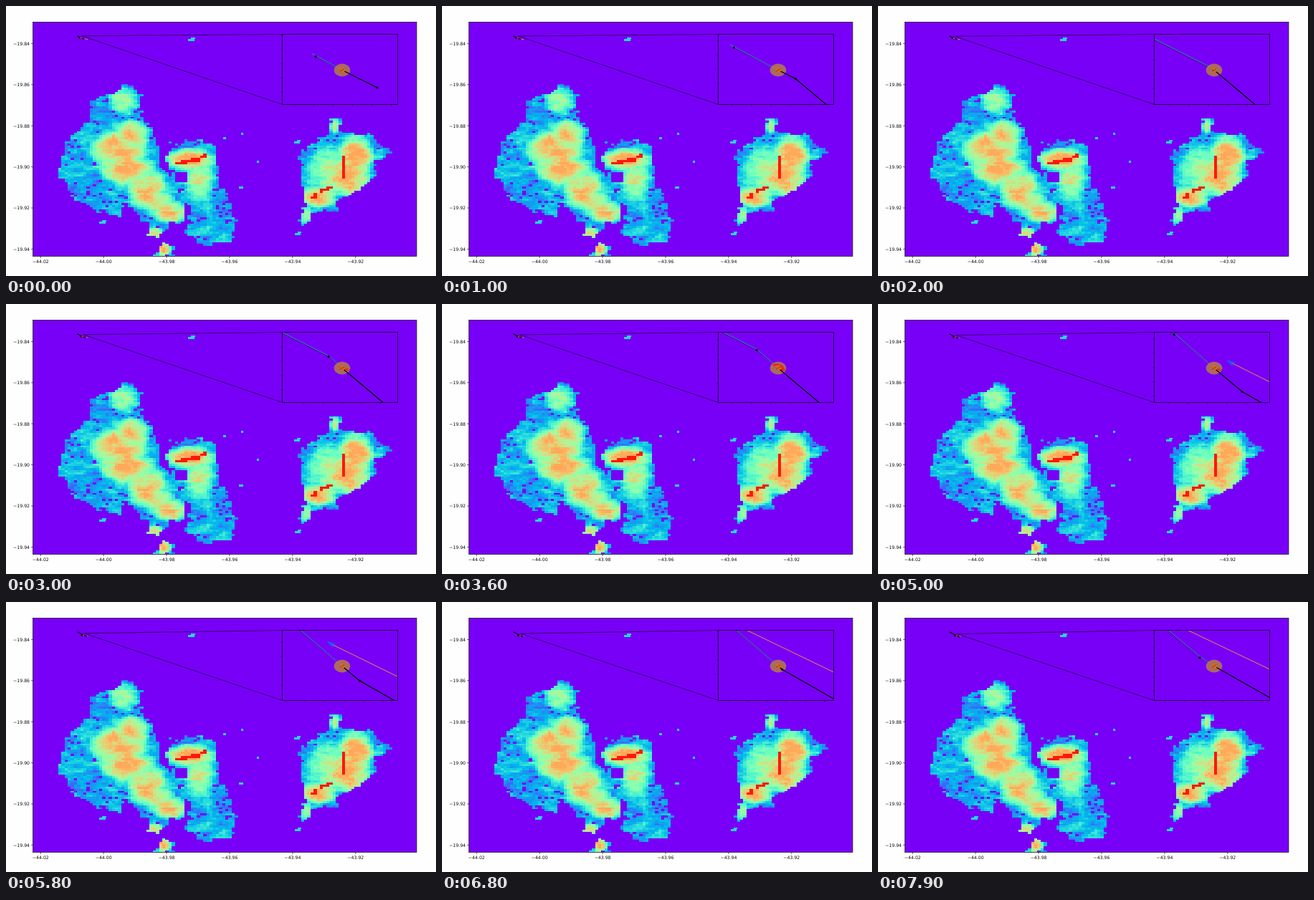
Animation, 600 px wide and 377 px high, one loop 8 s. Source, as an HTML page with a canvas:

```html
<!DOCTYPE html>
<html>
<head>
<meta charset="utf-8">
<style>
html, body { margin: 0; width: 100%; height: 100%; overflow: hidden; background: #fefefe; }
canvas { display: block; width: 600px; height: 377px; }
</style>
</head>
<body>
<canvas id="stage" width="600" height="377"></canvas>
<script>
const ctx = stage.getContext('2d');
const PURPLE = '#7800f6';
const AXES = { x: 37.5, y: 22.5, w: 535.5, h: 327 };
const INSET = { x: 385.5, y: 39.5, w: 161, h: 98 };
const HUB = [469, 89.5];
const CELL = { w: 4.4, h: 2.87 };

function outline(...p) {
  const path = new Path2D();
  for (let i = 0; i < p.length; i += 2) path.lineTo(p[i], p[i + 1]);
  return path;
}
const west = outline(172,106, 185,117, 187,151, 206,167, 211,206, 216,220, 232,240, 249,265, 252,303,
  228,303, 216,323, 195,320, 204,308, 178,288, 160,270, 160,295, 139,290, 128,288, 96,272, 75,237,
  76,210, 92,180, 114,163, 116,131, 151,121);
const middle = outline(228,188, 264,188, 290,189, 300,250, 309,263, 322,300, 316,328, 268,335, 251,315,
  260,284, 247,258, 224,222);
const east = outline(453,156, 466,157, 468,179, 508,181, 542,207, 516,216, 517,232, 494,258, 464,272,
  464,287, 432,286, 420,304, 409,304, 418,280, 412,238, 414,200, 440,181, 452,178);
const south = outline(217,329, 226,331, 238,350, 207,350);
const regions = [west, middle, east, south];

// Hills: x, y, rx, ry
const highHills = [
  [174,181,20,17], [158,201,30,22], [170,228,30,17], [196,256,21,23], [231,288,19,12], [207,318,11,7],
  [258,214,28,12], [487,209,19,22], [477,237,25,23], [436,266,21,12], [220,339,8,9]
];
const lowHills = [
  [164,133,20,19], [211,274,24,20], [271,243,19,32], [450,235,28,36], [459,167,7,12], [418,291,9,11]
];
// Peaks are short strokes, specks are x, y, width
const peaks = [[239,220,268,214], [274,210,279,208], [470,211,470,239], [428,268,433,264], [440,258,453,253]];
const specks = [[254,46,9], [402,189,8], [350,216,3], [328,177,3], [303,183,4], [325,252,6], [403,317,8], [130,301,9]];

function hash(x, y) {
  const s = Math.sin(x * 127.1 + y * 311.7) * 43758.5453;
  return s - Math.floor(s);
}
const mix = (a, b, k) => a + (b - a) * k;
function noise(x, y) {
  const i = Math.floor(x), j = Math.floor(y), u = x - i, v = y - j;
  return mix(mix(hash(i, j), hash(i + 1, j), u), mix(hash(i, j + 1), hash(i + 1, j + 1), u), v) - .5;
}
function rainbow(v) {
  const c = [Math.abs(2 * v - .5), Math.sin(Math.PI * v), Math.cos(Math.PI * v / 2)];
  return `rgb(${c.map(k => Math.round(255 * Math.min(1, k))).join()})`;
}
function nearStroke(x, y, [x1, y1, x2, y2]) {
  const dx = x2 - x1, dy = y2 - y1;
  const k = Math.max(0, Math.min(1, ((x - x1) * dx + (y - y1) * dy) / (dx * dx + dy * dy)));
  return Math.hypot(x - x1 - k * dx, y - y1 - k * dy) < 2.4;
}
const rise = (x, y, top, hills) => Math.max(...hills.map(([cx, cy, rx, ry]) =>
  top - .25 * (((x - cx) / rx) ** 2 + ((y - cy) / ry) ** 2)));
function level(x, y, i, j) {
  if (peaks.some(p => nearStroke(x, y, p))) return .97;
  const v = Math.max(.25, rise(x, y, .78, highHills), rise(x, y, .6, lowHills));
  const rough = .2 * noise(i / 2.5, j / 1.3) + .16 * noise(i / 5 + 40, j / 5) + .08 * (hash(i, j) - .5);
  return Math.max(.1, Math.min(.77, v + rough));
}

function line(g, color, width, ...points) {
  g.beginPath();
  points.forEach(p => g.lineTo(p[0], p[1]));
  g.strokeStyle = color;
  g.lineWidth = width;
  g.stroke();
}
function ellipse(color, x, y, rx, ry = rx) {
  ctx.beginPath();
  ctx.ellipse(x, y, rx, ry, 0, 0, 7);
  ctx.fillStyle = color;
  ctx.fill();
}

function drawTerrain(g) {
  const column = i => Math.round(AXES.x + i * CELL.w), row = j => Math.round(AXES.y + j * CELL.h);
  for (let j = 0; j < 114; j++) for (let i = 0; i < 122; i++) {
    const x0 = column(i), y0 = row(j), x = x0 + 2.2, y = y0 + 1.4;
    const px = x + 10 * noise(i / 2 + 9, j / 1.5), py = y + 7 * noise(i / 2, j / 2 + 30);
    const hole = x > 235 && x < 254 && y > 233 && y < 245;
    if (hole || !regions.some(p => g.isPointInPath(p, px, py))) continue;
    const v = level(x, y, i, j);
    if (v < .24 && hash(i + 7, j) > .83) continue;
    g.fillStyle = rainbow(v);
    g.fillRect(x0, y0, column(i + 1) - x0, row(j + 1) - y0);
  }
  g.fillStyle = rainbow(.32);
  for (const [x, y, w] of specks) {
    g.fillRect(x, y, w, 3);
    if (w > 7) g.fillRect(x + 4, y - 2, w - 3, 2);
  }
}

function drawMap() {
  const layer = document.createElement('canvas');
  layer.width = 600;
  layer.height = 377;
  const g = layer.getContext('2d');
  g.fillStyle = '#fefefe';
  g.fillRect(0, 0, 600, 377);
  g.fillStyle = PURPLE;
  g.fillRect(AXES.x, AXES.y, AXES.w, AXES.h);
  g.save();
  g.beginPath();
  g.rect(AXES.x, AXES.y, AXES.w, AXES.h);
  g.clip();
  drawTerrain(g);
  g.restore();
  g.strokeStyle = '#111';
  g.lineWidth = .7;
  g.strokeRect(AXES.x, AXES.y, AXES.w, AXES.h);
  g.font = '6.2px "DejaVu Sans", sans-serif';
  for (let n = 0; n < 6; n++) {
    const x = 48.3 + 87.9 * n, y = 52.4 + 57.4 * n;
    line(g, '#111', .7, [x, 349.5], [x, 352]);
    line(g, '#111', .7, [35, y], [37.5, y]);
    g.fillStyle = '#111';
    g.textAlign = 'center';
    g.fillText('−' + (44.02 - .02 * n).toFixed(2), x, 358.6);
    g.textAlign = 'right';
    g.fillText('−' + (19.84 + .02 * n).toFixed(2), 33, y + 2.3);
  }
  return layer;
}
const map = drawMap();

const route = [[0, 0], [86, 43.5], [181, 123.5], [381, 237.5]];
function position(t) {
  if (t < 1.98) return [37 + 24.7 * t, 19 + 12.4 * t];
  if (t < 7.11) return [86 + 18.5 * (t - 1.98), 43.5 + 15.6 * (t - 1.98)];
  return [181 + 25.5 * (t - 7.11), 123.5 + 15 * (t - 7.11)];
}

function drawLocator(pos) {
  const x = 105.5 + pos[0] * .03, y = 41.2 + pos[1] * .025;
  line(ctx, '#1c003c', .7, [x, y], [INSET.x, INSET.y]);
  line(ctx, '#1c003c', .7, [x - 1, y], [INSET.x, INSET.y + INSET.h]);
  line(ctx, '#000', 1.2, [99.5, 41.8], [103, 43.5], [x + 2.5, y + 4.5]);
  line(ctx, '#e08040', 1, [x + 3, y + 4], [114.5, 47]);
  ellipse('#14001e', x - 3.5, y + 2.3, 2.4, 1.6);
  ellipse('#c0522c', x - 2, y + 2.6, 1.2, 1);
}

function shape(color, x, y, ...points) {
  ctx.beginPath();
  points.forEach(([a, b]) => ctx.lineTo(x + a, y + b));
  ctx.fillStyle = color;
  ctx.fill();
}

function drawAlert(size) {
  ctx.beginPath();
  ctx.ellipse(...HUB, 11.3 * Math.sqrt(size), 9 * size, .35, Math.PI * 1.05, Math.PI * 2.1);
  ctx.fillStyle = '#e62a20';
  ctx.fill();
  line(ctx, '#e62a20', 2, [HUB[0] - 3, HUB[1] - 2], [HUB[0] + 10, HUB[1] + 3]);
}

function drawInset(t, pos) {
  const view = ([x, y]) => [HUB[0] + x - pos[0], HUB[1] + y - pos[1]];
  const legs = t < 1.98 ? 1 : t < 7.11 ? 2 : 3;
  const { x, y, w, h } = INSET;
  ctx.save();
  ctx.beginPath();
  ctx.rect(x, y, w, h);
  ctx.fillStyle = PURPLE;
  ctx.fill();
  ctx.clip();

  // Crossing vehicle
  const other = view([191 - 30 * (t - 4.2), 94.5 - 13.4 * (t - 4.2)]);
  line(ctx, '#f08c3c', 1, view([300, 150]), other);
  shape('#2058f0', ...other, [-8, -5], [5, -1], [0, 1], [3, 4], [-2, 2]);

  // Travelled and planned route
  const passed = route.slice(0, legs).map(view);
  const ahead = route.slice(legs, t < .5 ? 2 : 4).map(view);
  line(ctx, '#20104c', .7, ...passed, HUB);
  line(ctx, '#1c8fa8', 1, view([-5, -4]), ...passed.map(([a, b]) => [a + .7, b - .8]), HUB);
  ellipse('rgba(180,128,68,.83)', ...HUB, 11.3, 9);

  // Proximity warning inside the safety disc
  const fade = Math.max(0, 1 - (t - 4.2) / .8);
  const alert = t < 2.4 ? 0 : t < 4.2 ? .3 + .7 * Math.max(0, (t - 3) / 1.2) : fade;
  if (alert) drawAlert(alert);

  line(ctx, '#000', 1.3, HUB, ...ahead);
  for (const p of [...passed, ...ahead]) ellipse('#000', ...p, 1.5);
  shape('#dc661c', ...HUB, [-5, -3], [2, -4], [5, 1], [1, 3], [-4, 3], [-1, 0]);
  line(ctx, '#6b3c18', .8, [HUB[0] - 3, HUB[1] + 2], [HUB[0] + 3, HUB[1] - 2]);
  ctx.restore();

  ctx.strokeStyle = '#120024';
  ctx.lineWidth = .8;
  ctx.strokeRect(x, y, w, h);
  for (let n = 0; n < 6; n++) {
    const tx = x + 27 * (n + 1) - pos[0] % 27, ty = y + 20 * (n + 1) - pos[1] % 20;
    if (tx < x + w) line(ctx, '#120024', .6, [tx, y + h], [tx, y + h + 1.8]);
    if (ty < y + h) line(ctx, '#120024', .6, [x - 1.8, ty], [x, ty]);
  }
}

function draw(now) {
  const t = Math.floor(now % 8000 / 100) / 10;
  const pos = position(t);
  ctx.drawImage(map, 0, 0);
  drawLocator(pos);
  drawInset(t, pos);
  requestAnimationFrame(draw);
}
requestAnimationFrame(draw);
</script>
</body>
</html>
```
